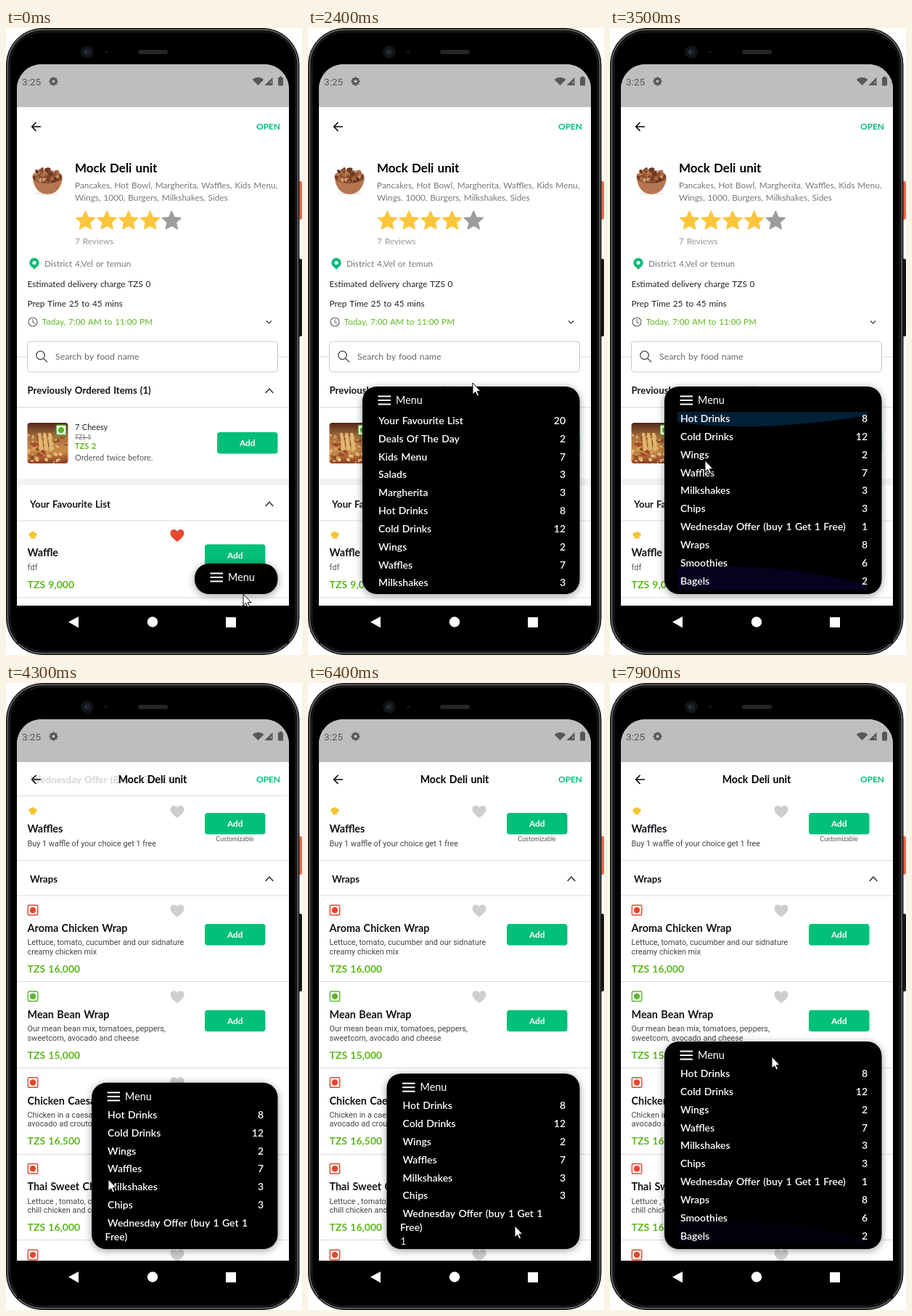
Recreate the animation shown at these times as an HTML page with a canvas. Size 408 by 864 pixels, loop 8000 ms.

```html
<!DOCTYPE html>
<html lang="en">
<head>
<meta charset="utf-8">
<title>Restaurant menu</title>
<style>
html, body { margin: 0; width: 100%; height: 100%; overflow: hidden; background: #fff; }
canvas { display: block; }
</style>
</head>
<body>
<canvas id="stage" width="408" height="864"></canvas>
<script>
const ctx = document.getElementById('stage').getContext('2d');
const LOOP = 8000;
const GREEN = '#00bf78', PRICE = '#5db81c', INK = '#111418', GREY = '#777', LINE = '#d9d9d9';
const LATO = 'Lato, sans-serif', ROBOTO = 'Roboto, sans-serif';
const SHOP = 'Mock Deli unit', PLACE = 'District 4,Vel or temun';

const MENU = [
  ['Your Favourite List', 20], ['Deals Of The Day', 2], ['Kids Menu', 7], ['Salads', 3],
  ['Margherita', 3], ['Hot Drinks', 8], ['Cold Drinks', 12], ['Wings', 2], ['Waffles', 7],
  ['Milkshakes', 3], ['Chips', 3], ['Wednesday Offer (buy 1 Get 1 Free)', 1],
  ['Wraps', 8], ['Smoothies', 6], ['Bagels', 2]
];
const WRAPS = [
  ['Aroma Chicken Wrap', 'Lettuce, tomato, cucumber and our sidnature', 'creamy chicken mix', '16,000'],
  ['Mean Bean Wrap', 'Our mean bean mix, tomatoes, peppers,', 'sweetcorn, avocado and cheese', '15,000'],
  ['Chicken Caesar Wrap', 'Chicken in a caesari saurce with lettuce and', 'avocado ad croutons', '16,500'],
  ['Thai Sweet Chill Chicken Wrap', 'Lettuce , tomato, carrot, tender thai sweet', 'chill chicken and crushed peanuts', '16,000'],
  ['', '', '', '']
];

// Keyframes: time, then values
const OPEN = [[1300, 0], [1600, 1], [4206, 1], [4506, 0], [6180, 0], [6450, .9], [6550, .9], [6850, 0], [7200, 0], [7500, 1]];
const SCROLL = [[3100, 0], [3450, 127]];
const POINTER = [
  [0, 327, 780], [300, 325, 785], [800, 290, 760], [1900, 291, 760], [2400, 227, 489], [2750, 226, 492],
  [3100, 146, 722], [3450, 131, 596], [3650, 131, 596], [4100, 139, 706], [4300, 141, 684], [5000, 235, 602],
  [5450, 238, 602], [6150, 285, 749], [6400, 285, 748], [7150, 287, 752], [7700, 286, 750], [7900, 223, 515]
];
const TOP_GLOW = [[3200, 0], [3450, 1], [3550, 1], [3800, 0]];
const END_GLOW = [[3300, 0], [3480, 1], [3550, 1], [3800, 0], [7750, 0], [7900, .4]];

function sample(keys, t) {
  if (t <= keys[0][0]) return keys[0].slice(1);
  for (let i = 1; i < keys.length; i++) {
    const a = keys[i - 1], b = keys[i];
    if (t < b[0]) {
      const x = (t - a[0]) / (b[0] - a[0]), e = x * x * (3 - 2 * x);
      return a.slice(1).map((v, k) => v + (b[k + 1] - v) * e);
    }
  }
  return keys[keys.length - 1].slice(1);
}

function text(s, x, y, size, color = INK, weight = 400, align = 'left', family = LATO) {
  ctx.font = `${weight} ${size}px ${family}`;
  ctx.wordSpacing = family === LATO ? size * .06 + 'px' : '0px';
  ctx.textAlign = align;
  ctx.fillStyle = color;
  ctx.fillText(s, x, y + size * .35);
}

function rect(x, y, w, h, color) {
  ctx.fillStyle = color;
  ctx.fillRect(x, y, w, h);
}

function round(x, y, w, h, r, fill, stroke, width = 1) {
  ctx.beginPath();
  ctx.roundRect(x, y, w, h, r);
  paint(fill, stroke, width);
}

function disc(x, y, r, fill, stroke, width = 1) {
  ctx.beginPath();
  ctx.arc(x, y, r, 0, 7);
  paint(fill, stroke, width);
}

function poly(points, fill, stroke, width = 1, closed = true) {
  ctx.beginPath();
  points.forEach(([x, y]) => ctx.lineTo(x, y));
  if (closed) ctx.closePath();
  paint(fill, stroke, width);
}

function paint(fill, stroke, width) {
  if (fill) { ctx.fillStyle = fill; ctx.fill(); }
  if (stroke) { ctx.strokeStyle = stroke; ctx.lineWidth = width; ctx.stroke(); }
}

function randomizer(seed) {
  return () => (seed = seed * 16807 % 2147483647) / 2147483647;
}

const divider = y => rect(15, y, 375, 1, LINE);
const chevron = (x, y, w, h, color) => poly([[x - w, y + h], [x, y - h], [x + w, y + h]], null, color, 1.8, false);

function addButton(x, y) {
  round(x, y, 83.5, 29.5, 4, GREEN);
  text('Add', x + 41.8, y + 15, 11.9, '#fff', 700, 'center');
}

function heart(x, y, color) {
  ctx.beginPath();
  ctx.moveTo(x, y + 8.5);
  ctx.bezierCurveTo(x - 6, y + 3.5, x - 9.5, y + 1, x - 9.5, y - 3.5);
  ctx.bezierCurveTo(x - 9.5, y - 9, x - 2.5, y - 10.5, x, y - 5.8);
  ctx.bezierCurveTo(x + 2.5, y - 10.5, x + 9.5, y - 9, x + 9.5, y - 3.5);
  ctx.bezierCurveTo(x + 9.5, y + 1, x + 6, y + 3.5, x, y + 8.5);
  paint(color);
}

function chefHat(x, y) {
  [[-2.8, -.5], [0, -2], [2.8, -.5]].forEach(([dx, dy]) => disc(x + dx, y + dy, 2.8, '#f6c431'));
  rect(x - 3.3, y, 6.6, 5, '#f6c431');
}

function dietMark(x, y, color) {
  round(x - 6.7, y - 6.7, 13.4, 13.4, 1.5, '#fff', color, 1.4);
  disc(x, y, 4.2, color);
}

function star(x, y, color) {
  const points = Array.from({ length: 10 }, (_, i) => {
    const a = (i / 5 - .5) * Math.PI, r = i % 2 ? 6.4 : 13.6;
    return [x + r * Math.cos(a), y + 1 + r * Math.sin(a)];
  });
  ctx.lineJoin = 'round';
  poly(points, color, color, 1.4);
  ctx.lineJoin = 'miter';
}

function bowl() {
  const rnd = randomizer(71);
  ctx.fillStyle = '#eee';
  ctx.beginPath();
  ctx.ellipse(57, 228, 17, 3, 0, 0, 7);
  ctx.fill();
  ctx.beginPath();
  ctx.moveTo(37, 207);
  ctx.bezierCurveTo(38, 220, 46, 229, 57, 229);
  ctx.bezierCurveTo(69, 229, 76, 220, 78, 207);
  paint('#b5764f');
  ctx.fillStyle = '#7d4328';
  ctx.beginPath();
  ctx.ellipse(57, 205, 20.5, 9, 0, 0, 7);
  ctx.fill();
  for (let i = 0; i < 42; i++) {
    const a = rnd() * 6.3, d = Math.sqrt(rnd());
    ctx.beginPath();
    ctx.ellipse(57 + 17 * d * Math.cos(a), 203 + 9.5 * d * Math.sin(a), 3.2, 2.2, rnd() * 3, 0, 7);
    paint(['#8f5030', '#ab6c45', '#cf9a72', '#6b3520'][i % 4]);
  }
}

function pizza() {
  const rnd = randomizer(29);
  ctx.save();
  ctx.beginPath();
  ctx.roundRect(29.5, 544, 56, 56, 4);
  ctx.clip();
  const g = ctx.createLinearGradient(0, 544, 0, 600);
  g.addColorStop(0, '#55261a');
  g.addColorStop(.35, '#a8703f');
  g.addColorStop(.7, '#c98a48');
  g.addColorStop(1, '#8c3a20');
  rect(29, 544, 57, 56, g);
  for (let i = 0; i < 70; i++) {
    ctx.beginPath();
    ctx.ellipse(30 + rnd() * 56, 560 + rnd() * 40, 1.5 + rnd() * 2, 1 + rnd() * 1.5, rnd() * 3, 0, 7);
    paint(['#d8a45c', '#a5472a', '#e3bd7d', '#84502a'][i % 4]);
  }
  [44, 51, 58].forEach(x => poly([[x, 558], [x + 4, 558], [x + 8, 581], [x + 2, 583]], '#e0b670'));
  ctx.restore();
  rect(69, 547, 14, 14, '#fff');
  dietMark(76, 554, '#57b62a');
}

function appBar(y) {
  poly([[48, y], [36, y]], null, '#000', 1.6, false);
  poly([[41.5, y - 6], [35.7, y], [41.5, y + 6]], null, '#000', 1.6, false);
  text('OPEN', 378, y, 11.9, GREEN, 700, 'right');
}

function overview() {
  appBar(136);
  bowl();
  text(SHOP, 95, 193, 17, '#000', 700);
  text('Pancakes, Hot Bowl, Margherita, Waffles, Kids Menu,', 95, 217, 11.85, GREY);
  text('Wings, 1000, Burgers, Milkshakes, Sides', 95, 234, 11.85, GREY);
  for (let i = 0; i < 5; i++) star(109.5 + i * 29.7, 265, i < 4 ? '#fcc63c' : '#9c9c9c');
  text('7 Reviews', 95, 294, 11.9, '#999');

  poly([[32.8, 326], [45.2, 326], [39, 333]], '#10ba78');
  disc(39, 323.5, 6.7, '#10ba78');
  disc(39, 323.5, 2.6, '#fff');
  text(PLACE, 53, 325, 11.9, GREY);
  text('Estimated delivery charge TZS 0', 29.5, 353, 11.85, '#222');
  text('Prep Time 25 to 45 mins', 29.5, 380, 11.85, '#222');
  disc(37, 405, 6, null, '#666', 1.2);
  poly([[37, 401], [37, 405.5], [40, 407]], null, '#666', 1.1, false);
  text('Today, 7:00 AM to 11:00 PM', 49.5, 405, 11.75, PRICE);
  poly([[359, 403.5], [362.5, 407], [366, 403.5]], null, '#444', 1.3, false);

  divider(452.5);
  round(29.5, 432, 345, 42, 4, '#fff', '#c9c9c9');
  disc(47.5, 451, 5.8, null, '#555', 1.4);
  poly([[51.8, 455.3], [57, 460.5]], null, '#555', 1.5, false);
  text('Search by food name', 68, 453, 12.3, '#666');

  text('Previously Ordered Items (1)', 29.5, 499.5, 13.25, INK, 700);
  chevron(363, 500, 5.3, 2.8, '#444');
  divider(522);
  pizza();
  text('7 Cheesy', 95, 550, 11, '#222');
  text('TZS 5', 95, 564, 8.5, '#777');
  rect(95, 564, 22, 1, '#777');
  text('TZS 2', 95, 576, 11, PRICE, 700);
  text('Ordered twice before.', 95, 592, 11, '#555');
  addButton(291, 557);

  rect(15, 621, 375, 9, '#f2f2f2');
  text('Your Favourite List', 33, 656, 13.2, INK, 700);
  chevron(363, 656, 5.3, 2.8, '#444');
  divider(678.5);
  chefHat(37, 698.5);
  heart(236, 699.5, '#e8492f');
  text('Waffle', 29.5, 723, 14.4, INK, 700);
  text('fdf', 29.5, 743, 11, '#555', 400, 'left', ROBOTO);
  text('TZS 9,000', 29.5, 767, 14, PRICE, 700);
  addButton(274, 711.5);
  divider(784.5);
}

function wrapsSection(barAlpha) {
  const small = (s, y) => text(s, 29.5, y, 10.85, '#444', 400, 'left', ROBOTO);
  if (barAlpha < 1) text('Wednesday Offer (Buy 1 Get 1 F', 34, 133, 13.4, INK, 700);
  ctx.globalAlpha = barAlpha;
  rect(15, 109, 375, 47, '#fff');
  ctx.globalAlpha = 1;
  if (barAlpha < 1) divider(155);
  appBar(133);
  text(SHOP, 202, 133, 14.2, '#000', 700, 'center');

  chefHat(37, 176);
  heart(236, 177.5, '#cecece');
  text('Waffles', 29.5, 201, 14.4, INK, 700);
  small('Buy 1 waffle of your choice get 1 free', 221);
  addButton(274, 179);
  text('Customizable', 315.5, 215, 8.9, '#555', 400, 'center');
  divider(244);
  text('Wraps', 33, 270, 13.2, INK, 700);
  chevron(363, 270, 5.3, 2.8, '#444');
  divider(292.5);

  WRAPS.forEach(([name, first, second, price], i) => {
    const y = 313 + i * 118.75;
    dietMark(37, y, i === 1 ? '#5cb531' : '#e5472c');
    heart(236, y + 1, '#cecece');
    if (!name) return;
    text(name, 29.5, y + 25, 14.4, INK, 700);
    small(first, y + 44.5);
    small(second, y + 57);
    text('TZS ' + price, 29.5, y + 81, 14, PRICE, 700);
    addButton(274, y + 19);
    divider(Math.round(y + 98));
  });
}

function menuList(t, x, y, w) {
  const scroll = sample(SCROLL, t)[0];
  const top = y + 35, left = x + 18, right = 355.5;
  ctx.save();
  ctx.beginPath();
  ctx.rect(left, top, right - left + 1, 774 - top);
  ctx.clip();

  ctx.globalAlpha = sample(TOP_GLOW, t)[0];
  ctx.beginPath();
  ctx.moveTo(left, top);
  ctx.lineTo(right, top);
  ctx.lineTo(right, top + 5);
  ctx.quadraticCurveTo(x + 125, top + 30, left, top + 14);
  paint('#002037');
  ctx.globalAlpha = sample(END_GLOW, t)[0];
  ctx.beginPath();
  ctx.moveTo(left, 742);
  ctx.quadraticCurveTo(x + 170, 736, right, 768);
  ctx.lineTo(right, 778);
  ctx.lineTo(left, 778);
  paint('#07001f');
  ctx.globalAlpha = 1;

  let rowY = y + 47 - scroll;
  for (const [name, count] of MENU) {
    if (name.length > 30 && w < 285) {
      text(name.slice(0, -6), x + 22, rowY, 14, '#fff', 600);
      text(name.slice(-5), x + 18.5, rowY + 19, 14, '#fff', 600);
      text(count, x + 19, rowY + 38, 13, '#fff');
      rowY += 62;
    } else {
      text(name, x + 22, rowY, 14, '#fff', 600);
      text(count, 355, rowY, 14, '#fff', 600, 'right');
      rowY += 24.83;
    }
  }
  ctx.restore();
}

function menuPanel(t) {
  const open = sample(OPEN, t)[0];
  const w = 114.5 + 185 * open, h = 42 + 244 * open, x = 374.5 - w, y = 780 - h;
  ctx.save();
  ctx.shadowColor = 'rgba(0,0,0,.4)';
  ctx.shadowBlur = 11;
  ctx.shadowOffsetY = 2;
  round(x, y, w, h, 20, '#000');
  ctx.restore();
  for (let i = 0; i < 3; i++) rect(x + 21.5, y + 12.5 + i * 5.5, 17.5, 2, '#fff');
  text('Menu', x + 46, y + 19, 14.4, '#fff');
  if (open > 0) menuList(t, x, y, w);
}

function phone() {
  rect(0, 0, 408, 864, '#fff');
  round(402, 211, 6, 53, 2, '#e9694c');
  round(402, 318, 6, 107, 2, '#151515');
  round(.5, .5, 403.5, 863, 50, '#2b2b2b', '#111');
  round(2.5, 2.5, 399.5, 859, 48, '#0b0b0b', '#666', 1.5);
  round(5.5, 5.5, 393.5, 853, 45, '#000', '#262626');
  disc(112, 33, 9, '#111317');
  disc(112, 33, 4.5, '#1d222b');
  disc(110, 33, 1.5, '#3c434f');
  disc(138, 33, 2, '#14171b');
  round(182, 30, 41, 6, 3, '#252525');
}

function statusBar() {
  const tone = '#575757';
  rect(15, 50, 375, 59, '#bebebe');
  text('3:25', 22, 74, 13.6, tone, 400, 'left', ROBOTO);
  for (let i = 0; i < 8; i++) {
    const a = i * Math.PI / 4;
    disc(65.5 + 4.7 * Math.cos(a), 73.5 + 4.7 * Math.sin(a), 1.5, tone);
  }
  disc(65.5, 73.5, 3.4, null, tone, 2.6);
  ctx.beginPath();
  ctx.moveTo(347.5, 79);
  ctx.arc(347.5, 79, 11, -Math.PI * .75, -Math.PI * .25);
  paint(tone);
  poly([[356.5, 79], [367.5, 79], [367.5, 68]], tone);
  poly([[364, 76], [366, 76], [366, 73]], '#bebebe');
  round(375, 68, 7, 11.5, 1, tone);
  rect(377, 66.7, 3, 2, tone);
}

function navBar() {
  rect(15, 796, 375, 52, '#000');
  poly([[86, 818.5], [100, 811], [100, 826.5]], '#fff');
  disc(202, 818.5, 7.2, '#fff');
  rect(303, 812, 14, 14, '#fff');
}

function pointer(t) {
  const [x, y] = sample(POINTER, t);
  const shape = [[0, 0], [0, 16], [3.7, 12.6], [6.2, 18], [8.6, 17], [6.2, 11.6], [11, 11.6]];
  poly(shape.map(([dx, dy]) => [x + dx, y + dy]), '#fff', '#000', 1);
}

function draw(t) {
  phone();
  ctx.save();
  ctx.beginPath();
  ctx.roundRect(15, 50, 375, 746, [34, 34, 0, 0]);
  ctx.clip();
  rect(15, 50, 375, 746, '#fff');
  statusBar();
  if (t < 4200) overview();
  else wrapsSection(Math.min(1, .6 + (t - 4200) / 450));
  menuPanel(t);
  ctx.restore();
  navBar();
  pointer(t);
}

let start;
function frame(now) {
  start ??= now;
  draw((now - start) % LOOP);
  requestAnimationFrame(frame);
}
requestAnimationFrame(frame);
</script>
</body>
</html>
```
